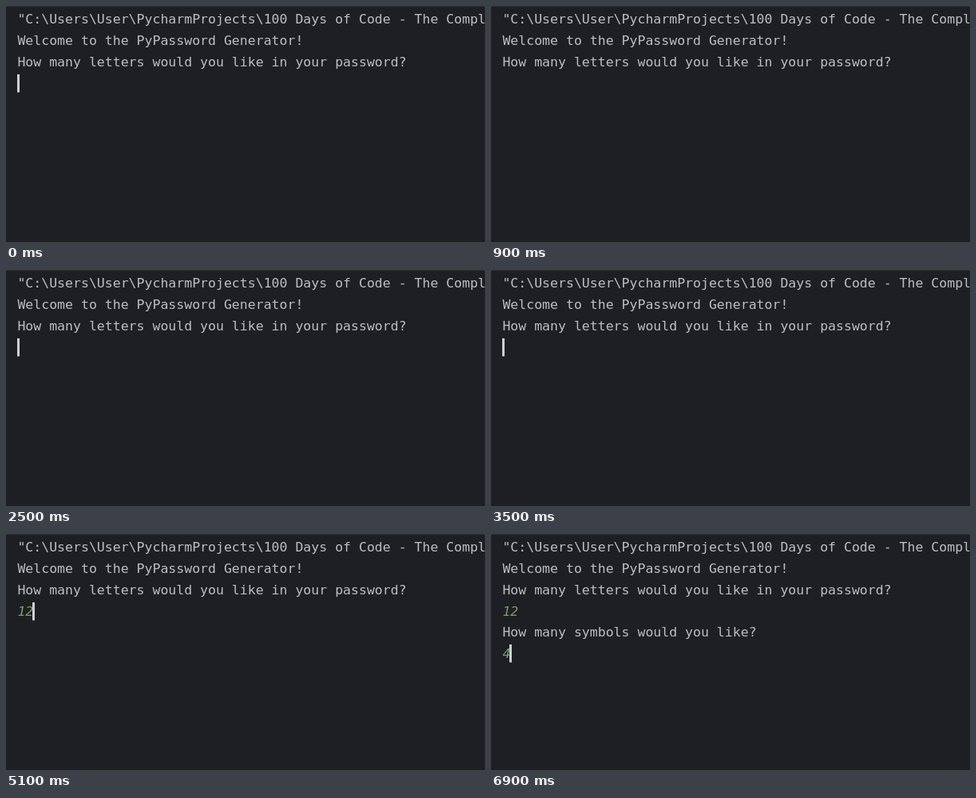
An HTML page with a canvas that plays this animation: 600x297 px, repeating every 8000 ms.

```html
<!DOCTYPE html>
<html lang="en">
<head>
<meta charset="utf-8">
<title>Password generator console</title>
<style>
  html, body { margin: 0; width: 100%; height: 100%; overflow: hidden; background: #1e1f22; }
  canvas { display: block; }
</style>
</head>
<body>
<canvas id="stage" width="600" height="297"></canvas>
<script>
const ctx = document.getElementById("stage").getContext("2d");
const LOOP = 8000;
const TEXT_LEFT = 14.4;
const CARET_LEFT = 14;
const ADVANCE = 9.945;
const FONT = '16.52px "DejaVu Sans Mono", "Noto Sans Mono", monospace';
const COLORS = { back: "#1e1f22", edge: "#2b2d30", text: "#bcbec4", input: "#73a068", caret: "#ced0d6" };

const OUTPUT = [
  '"C:\\Users\\User\\PycharmProjects\\100 Days of Code - The Compl',
  "Welcome to the PyPassword Generator!",
  "How many letters would you like in your password?"
];
const SECOND_PROMPT = "How many symbols would you like?";

const TYPED = [
  { row: 3, keys: [[4400, "1"], [5100, "2"]] },
  { row: 5, keys: [[6900, "4"]] }
];
const ENTER = 5700;
const CARET_OFF = [[900, 1500], [2000, 2500], [3000, 3500], [4100, 4400], [6600, 6900]];

const baseline = row => Math.round(22 + 26.85 * row);

function write(text, row, color, style = "") {
  ctx.font = `${style} ${FONT}`;
  ctx.fillStyle = color;
  ctx.fillText(text, TEXT_LEFT, baseline(row));
}

function drawCaret(row, column) {
  ctx.fillStyle = COLORS.caret;
  ctx.fillRect(Math.floor(CARET_LEFT + column * ADVANCE), baseline(row) - 17, 3, 22.6);
}

function draw(t) {
  ctx.fillStyle = COLORS.back;
  ctx.fillRect(0, 0, 600, 297);
  ctx.fillStyle = COLORS.edge;
  ctx.fillRect(0, 0, 600, 1);

  OUTPUT.forEach((line, row) => write(line, row, COLORS.text));
  if (t >= ENTER) write(SECOND_PROMPT, 4, COLORS.text);

  const entries = TYPED.map(({ row, keys }) => ({
    row,
    text: keys.filter(([at]) => t >= at).map(([, key]) => key).join("")
  }));
  entries.forEach(({ row, text }) => write(text, row, COLORS.input, "italic"));

  const active = entries[t < ENTER ? 0 : 1];
  const hidden = CARET_OFF.some(([from, to]) => t >= from && t < to);
  if (!hidden) drawCaret(active.row, active.text.length);
}

function tick() {
  draw(performance.now() % LOOP);
  requestAnimationFrame(tick);
}
tick();
</script>
</body>
</html>
```
